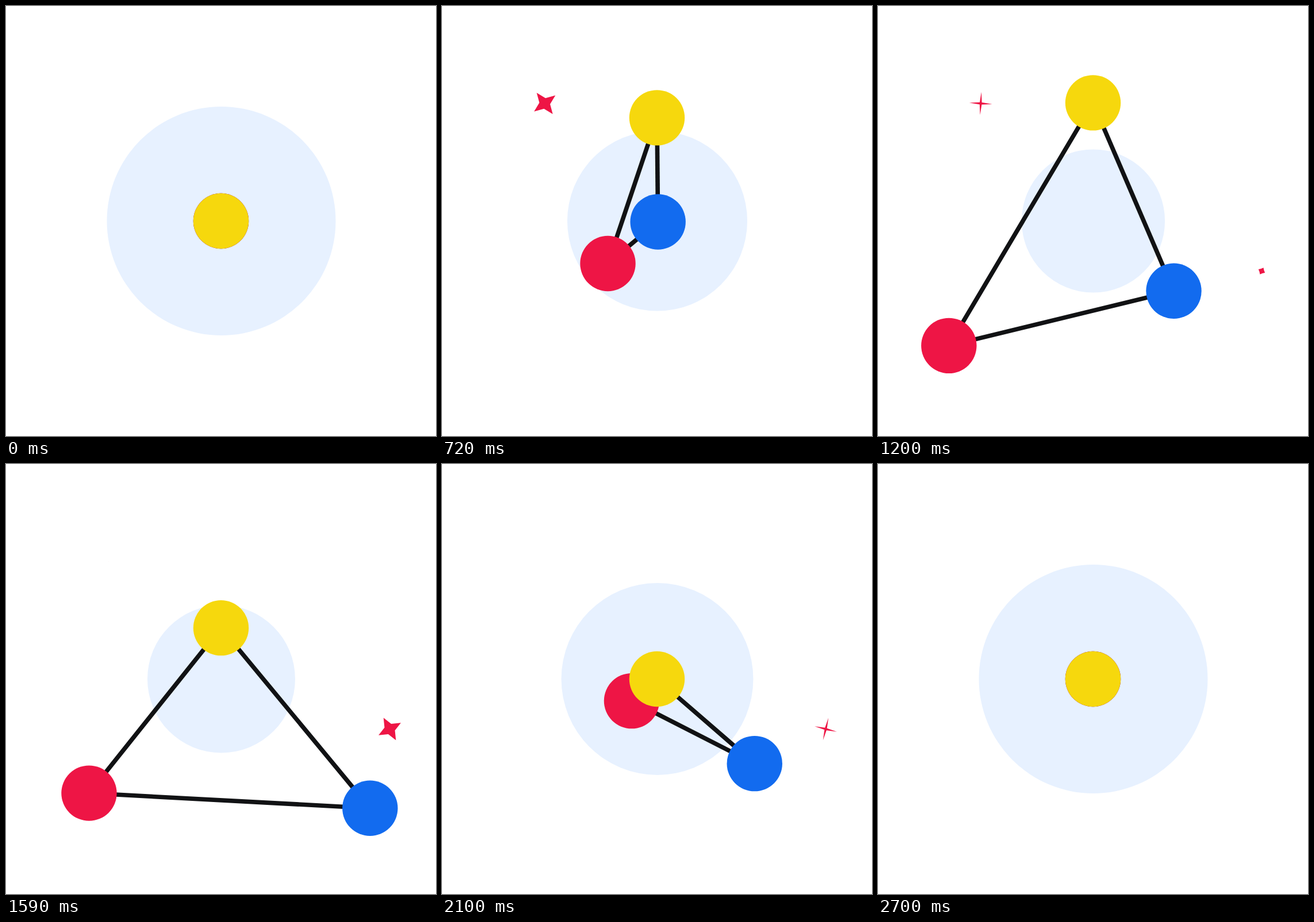
Animation, 748 px wide and 748 px high, one loop 2.73 s. Source, as an HTML page without scripts:

```html
<!DOCTYPE html>
<html lang="en">
<head>
<meta charset="utf-8">
<title>Triangle loader</title>
<style>
  @property --yy { syntax: "<number>"; inherits: true; initial-value: 0; }
  @property --rx { syntax: "<number>"; inherits: true; initial-value: 0; }
  @property --ry { syntax: "<number>"; inherits: true; initial-value: 0; }
  @property --bx { syntax: "<number>"; inherits: true; initial-value: 0; }
  @property --by { syntax: "<number>"; inherits: true; initial-value: 0; }

  :root {
    --loop: 2.73s;
    --smooth: cubic-bezier(.333, 0, .667, 1);
    --red: #ee1545;
  }
  html, body { margin: 0; width: 100%; height: 100%; overflow: hidden; background: #fff; }
  svg { display: block; width: 748px; height: 748px; }

  .disc { fill: #e7f1ff; animation: shrink var(--loop) var(--smooth) infinite; }
  @keyframes shrink {
    0%, 98.9%, 100% { r: 199px; }
    49.45% { r: 122px; }
  }

  /* Node offsets from the centre, shared by the dots and the links */
  .graph {
    animation: yellow var(--loop) var(--smooth) infinite,
               red var(--loop) var(--smooth) infinite,
               blue var(--loop) var(--smooth) infinite;
  }
  @keyframes yellow {
    0%, 74.07%, 100% { --yy: 0; }
    37.22% { --yy: -225.7; }
  }
  @keyframes red {
    0%, 12.34%, 86.45%, 100% { --rx: 0; --ry: 0; }
    49.6% { --rx: -267; --ry: 231; }
  }
  @keyframes blue {
    0%, 24.69%, 98.79%, 100% { --bx: 0; --by: 0; }
    61.94% { --bx: 266.5; --by: 231; }
  }

  .dot { r: 48.2px; translate: calc(var(--x) * 1px) calc(var(--y) * 1px); }
  .dot.yellow { --x: 0; --y: var(--yy); fill: #f6d80d; }
  .dot.red { --x: var(--rx); --y: var(--ry); fill: var(--red); }
  .dot.blue { --x: var(--bx); --y: var(--by); fill: #126bef; }

  /* A unit segment mapped onto the vector between two nodes */
  .link {
    --dx: calc(var(--x2) - var(--x1));
    --dy: calc(var(--y2) - var(--y1));
    stroke: #111214;
    stroke-width: 7.6px;
    vector-effect: non-scaling-stroke;
    transform: matrix(var(--dx), var(--dy), calc(-1 * var(--dy)), var(--dx), var(--x1), var(--y1));
  }
  .from-yellow { --x1: 0; --y1: var(--yy); }
  .from-red { --x1: var(--rx); --y1: var(--ry); }
  .to-red { --x2: var(--rx); --y2: var(--ry); }
  .to-blue { --x2: var(--bx); --y2: var(--by); }

  .star {
    fill: var(--red);
    animation: pop var(--loop) var(--smooth) infinite,
               spin var(--loop) linear infinite,
               sharpen var(--loop) linear infinite;
    animation-delay: var(--delay);
  }
  .star.left { --delay: 0s; --turn: -7.5deg; }
  .star.right { --delay: -1.83s; --turn: 3deg; }
  @keyframes pop {
    0%, 60.81%, 100% { scale: 0; }
    35.16% { scale: 1; }
  }
  @keyframes spin {
    from { rotate: var(--turn); }
    to { rotate: calc(var(--turn) + 229deg); }
  }
  @keyframes sharpen {
    0% { d: path("M27.5 0L16 16L0 27.5L-16 16L-27.5 0L-16 -16L0 -27.5L16 -16Z"); }
    43.96% { d: path("M27.5 0L2.5 2.5L0 27.5L-2.5 2.5L-27.5 0L-2.5 -2.5L0 -27.5L2.5 -2.5Z"); }
    60.81%, 100% { d: path("M27.5 0L.8 .8L0 27.5L-.8 .8L-27.5 0L-.8 -.8L0 -27.5L.8 -.8Z"); }
  }
</style>
</head>
<body>
<svg viewBox="0 0 748 748">
  <circle class="disc" cx="374.5" cy="374"/>
  <g transform="translate(178.7 169.5)"><path class="star left"/></g>
  <g transform="translate(667.5 461)"><path class="star right"/></g>
  <g transform="translate(374 374)">
    <g class="graph">
      <line class="link from-yellow to-red" x2="1"/>
      <line class="link from-yellow to-blue" x2="1"/>
      <line class="link from-red to-blue" x2="1"/>
      <circle class="dot blue"/>
      <circle class="dot red"/>
      <circle class="dot yellow"/>
    </g>
  </g>
</svg>
</body>
</html>
```
